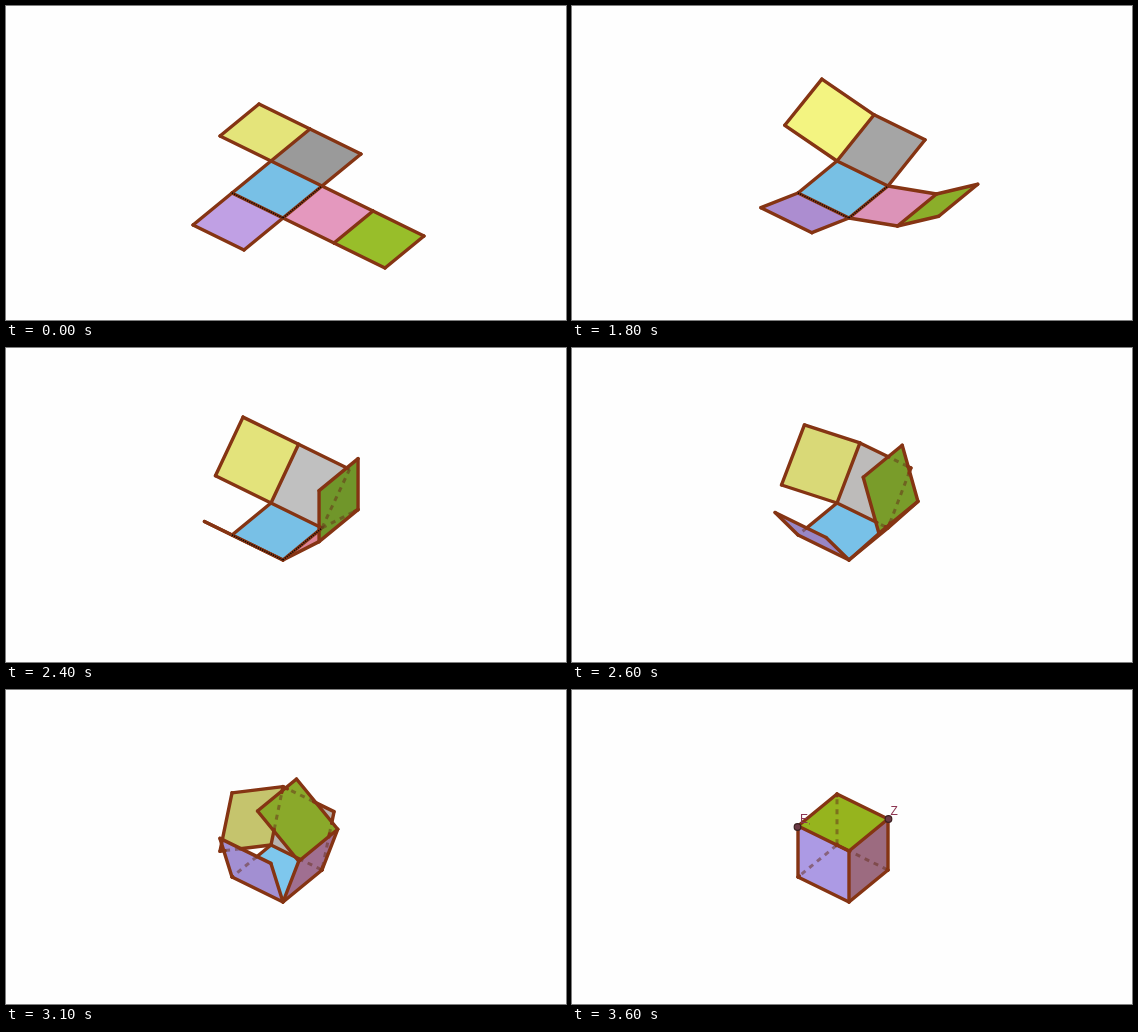
Recreate the animation shown at these times as an HTML page with a canvas. Size 560 by 314 pixels, loop 5100 ms.

```html
<!DOCTYPE html>
<html lang="en">
<head>
<meta charset="utf-8">
<title>Cube net folding</title>
<style>
  html, body { margin: 0; width: 100%; height: 100%; overflow: hidden; background: #fefefe; }
  canvas { display: block; }
</style>
</head>
<body>
<canvas id="stage" width="560" height="314"></canvas>
<script>
const ctx = document.getElementById('stage').getContext('2d');
const LOOP = 5100;
const STARTS = [1500, 1800, 2100, 2200, 2400, 2600, 2900, 3100, 3300, 3600];
const FOLD = Math.PI / 20;
const EDGE = '#853413';
const VIEW = [0.39, -0.51, 0.51]; // points towards the viewer

// Face shades at these fold steps; steps between are blended.
const KEYS = [0, 1, 3, 5, 7, 9, 10];
const SHADES = {
  gray:   '9a9a9a a0a0a0 aaaaaa c0c0c0 b9b5b3 b4aca8 b0a8a4',
  yellow: 'e4e47a ecef7e f9f984 e3e37b cfce72 bab968 b4b262',
  blue:   '78c0e6 78c0e4 78c0e4 78c0e6 78c1ea 84cdf0 84cdf0',
  pink:   'e498be e096bb d88fb5 dc8496 a5749a 9b6a88 9c6b80',
  purple: 'c0a0e4 b896dc a083c3 9a86c4 9686c6 ae98de ac9ae4',
  green:  '98be2a 92b82a 84a42a 70962a 82a22a 92b02a 96b41e'
};

const add = (p, q) => p.map((n, i) => n + q[i]);
const sub = (p, q) => p.map((n, i) => n - q[i]);
const dot = (p, q) => p[0] * q[0] + p[1] * q[1] + p[2] * q[2];
const cross = (p, q) => [
  p[1] * q[2] - p[2] * q[1],
  p[2] * q[0] - p[0] * q[2],
  p[0] * q[1] - p[1] * q[0]
];
const mix = (p, q, t) => p.map((n, i) => n + (q[i] - n) * t);
const project = ([a, b, c]) => [226 + 51 * a + 39 * b, 187 + 25 * a - 32 * b - 51 * c];
const rgb = hex => [0, 2, 4].map(i => parseInt(hex.slice(i, i + 2), 16));

function shade(name, step) {
  const list = SHADES[name].split(' ').map(rgb);
  let i = 0;
  while (i < KEYS.length - 2 && KEYS[i + 1] < step) i++;
  const t = (step - KEYS[i]) / (KEYS[i + 1] - KEYS[i]);
  return `rgb(${mix(list[i], list[i + 1], t).map(Math.round)})`;
}

// Each face is a corner and two sides, listed back to front.
function net(angle) {
  const s = Math.sin(angle), c = Math.cos(angle);
  const u = [1, 0, 0], v = [0, 1, 0];
  const face = (name, at, p, q) => ({
    name, at, p, q, corners: [at, add(at, p), add(add(at, p), q), add(at, q)]
  });
  return [
    face('gray', v, u, [0, c, s]),
    face('yellow', v, [0, c, s], [-c, -s * s, s * c]),
    face('blue', [0, 0, 0], u, v),
    face('pink', u, v, [c, 0, s]),
    face('purple', [0, 0, 0], u, [0, -c, s]),
    face('green', [1 + c, 0, s], v, [Math.cos(2 * angle), 0, Math.sin(2 * angle)])
  ];
}

function covers({ at, p, q }, point) {
  const n = cross(p, q), d = dot(n, VIEW);
  if (Math.abs(d) < 0.01) return false;
  const t = dot(n, sub(at, point)) / d;
  if (t < 0.02) return false;
  const hit = sub([0, 1, 2].map(i => point[i] + t * VIEW[i]), at);
  const a = dot(hit, p), b = dot(hit, q);
  return a > 0.02 && a < 0.98 && b > 0.02 && b < 0.98;
}

function edgesOf(faces) {
  const found = new Map();
  const key = p => p.map(n => Math.round(n * 1000) + 0).join();
  for (const { corners } of faces) {
    corners.forEach((p, i) => {
      const q = corners[(i + 1) % 4];
      found.set([key(p), key(q)].sort().join('|'), [p, q]);
    });
  }
  return [...found.values()];
}

// Splits an edge into stretches that are seen or hidden.
function split([p, q], faces) {
  const parts = [], count = 60;
  for (let i = 0; i < count; i++) {
    const mid = mix(p, q, (i + 0.5) / count);
    const hidden = faces.some(f => covers(f, mid));
    const last = parts[parts.length - 1];
    if (last && last.hidden === hidden) last.to = mix(p, q, (i + 1) / count);
    else parts.push({ hidden, from: mix(p, q, i / count), to: mix(p, q, (i + 1) / count) });
  }
  return parts;
}

function line(p, q, color, width, dash = []) {
  ctx.strokeStyle = color;
  ctx.lineWidth = width;
  ctx.lineCap = dash.length ? 'butt' : 'round';
  ctx.setLineDash(dash);
  ctx.beginPath();
  ctx.moveTo(...project(p));
  ctx.lineTo(...project(q));
  ctx.stroke();
}

function corner(x, y) {
  ctx.setLineDash([]);
  ctx.beginPath();
  ctx.arc(x, y, 3.3, 0, 7);
  ctx.fillStyle = '#6b3a45';
  ctx.fill();
  ctx.lineWidth = 1.2;
  ctx.strokeStyle = '#3a2020';
  ctx.stroke();
}

function labels() {
  corner(225.5, 137);
  corner(316.5, 129);
  ctx.fillStyle = '#8c3450';
  ctx.font = '12px "Liberation Sans", Arial, sans-serif';
  ctx.fillText('E', 228, 132.5);
  ctx.fillText('Z', 318.5, 125);
  ctx.font = '8px "Liberation Sans", Arial, sans-serif';
  ctx.fillText(',', 236.5, 134);
}

function draw(step) {
  const faces = net(step * FOLD);
  ctx.fillStyle = '#fefefe';
  ctx.fillRect(0, 0, 560, 314);
  for (const { name, corners } of faces) {
    ctx.fillStyle = shade(name, step);
    ctx.beginPath();
    corners.forEach(p => ctx.lineTo(...project(p)));
    ctx.fill();
  }
  const parts = edgesOf(faces).flatMap(e => split(e, faces));
  parts.filter(p => p.hidden)
    .forEach(p => line(p.from, p.to, 'rgba(100,45,25,.5)', 3, [5, 5]));
  parts.filter(p => !p.hidden)
    .forEach(p => line(p.from, p.to, EDGE, 3.4));
  if (step <= 5) {
    line([0, 0, 0], [1, 0, 0], '#100804', 1.6, [1.2, 1.2]);
    line([1, 0, 0], [1, 1, 0], '#100804', 1.6, [1.2, 1.2]);
  }
  if (step === 10) labels();
}

let shown = -1;
function tick() {
  const time = performance.now() % LOOP;
  const step = STARTS.filter(t => t <= time).length;
  if (step !== shown) draw(shown = step);
  requestAnimationFrame(tick);
}
tick();
</script>
</body>
</html>
```
